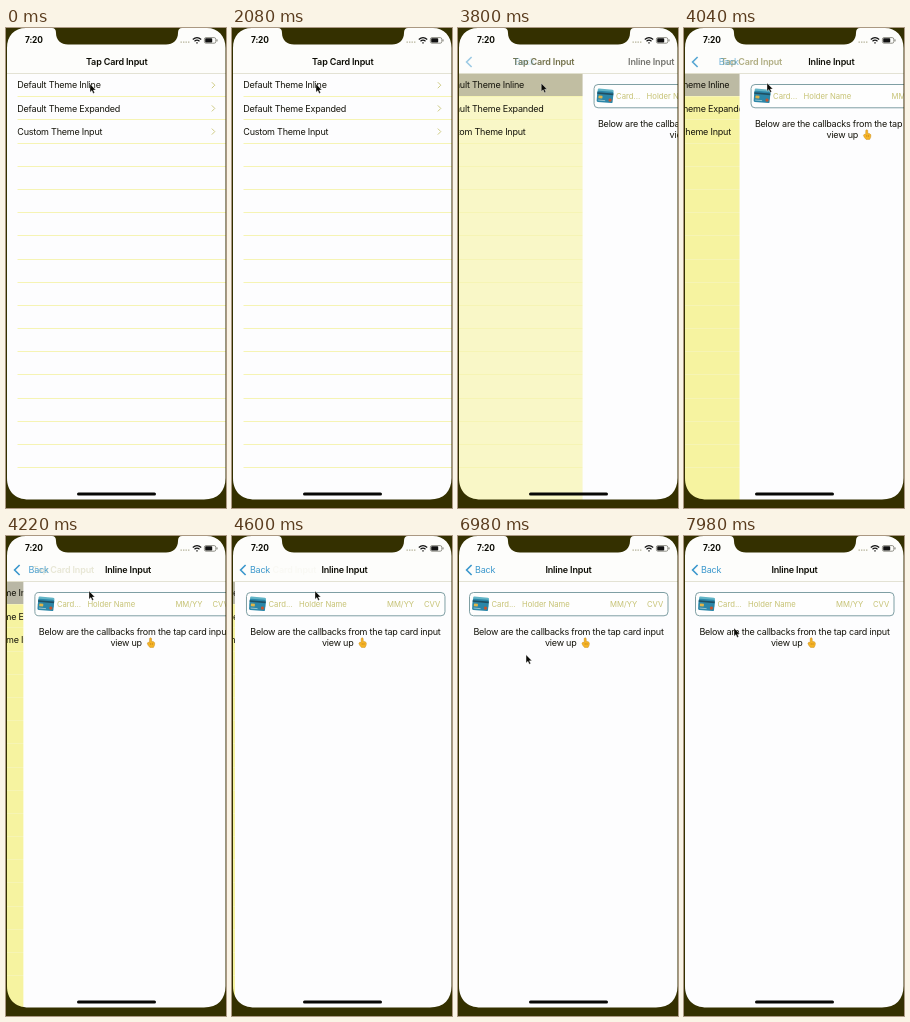
Recreate the animation shown at these times as an HTML page. Size 220x480 px, loop 8000 ms.

```html
<!DOCTYPE html>
<html lang="en">
<head>
<meta charset="utf-8">
<title>Card input demo</title>
<style>
  html, body { margin: 0; width: 100%; height: 100%; overflow: hidden; background: #343000; }
  svg { display: block; width: 100%; height: 100%; }
  text { font: 400 9px Inter, Roboto, sans-serif; letter-spacing: -.22px; fill: #14130a; white-space: pre; }
  .bold { font-weight: 600; letter-spacing: -.16px; fill: #0c0c04; }
  .mid { text-anchor: middle; }
  .hint { font-size: 7.7px; letter-spacing: 0; fill: #c6c274; }
  .blue { fill: #3a97cc; }
  .line { fill: none; stroke: #f6f4b4; stroke-width: 1; }
</style>
</head>
<body>
<svg viewBox="0 0 220 480" preserveAspectRatio="none">
  <rect width="220" height="480" fill="#fdfdfe"/>

  <g id="list">
    <rect id="tint" y="45" width="290" height="430" fill="#f6f3a0"/>
    <rect id="press" y="45.5" width="290" height="23.2"/>
    <g id="rows"></g>
  </g>

  <g id="detail">
    <rect y="45" width="220" height="430" fill="#fdfdfe"/>
    <rect x="11.5" y="56.5" width="198.5" height="23.3" rx="4" fill="#fefefe" stroke="#7f9fa4"/>
    <g transform="rotate(5 22 68)">
      <rect x="14.6" y="61" width="16" height="10" rx="1.3" fill="#62b4c6"/>
      <rect x="14.5" y="63.2" width="16" height="11.3" rx="1.3" fill="#2b86a8"/>
      <rect x="14.5" y="64.8" width="16" height="1.6" fill="#1f4f62"/>
      <rect x="16" y="68" width="4" height="2.8" rx=".5" fill="#e0b548"/>
      <path d="M16 72.6h7" stroke="#a9cfd6" stroke-width=".8"/>
      <circle cx="27.8" cy="71.6" r="1.6" fill="#c4552f"/>
    </g>
    <text class="hint" x="33.5" y="70.8">Card...</text>
    <text class="hint" x="64" y="70.8">Holder Name</text>
    <text class="hint" x="152" y="70.8">MM/YY</text>
    <text class="hint" x="189" y="70.8">CVV</text>
    <text class="mid" x="110.5" y="99.3">Below are the callbacks from the tap card input</text>
    <text x="87" y="109.6">view up</text>
    <path d="M126.3 102.2q1.1-.9 1.8.1l.2 3.3q2-.4 3 1.2q.3 2.6-1.2 4.6h-3.6q-2.2-2-2.6-4.2q.6-1.4 2.2-.6z" fill="#f6b526" stroke="#c98a1c" stroke-width=".5"/>
    <path d="M127.2 107.2v1.6M129 107.2v1.6" stroke="#b97518" stroke-width=".6"/>
  </g>

  <rect width="220" height="45.5" fill="#fdfdfb"/>
  <path d="M0 45.5H220" stroke="#dedccb" stroke-width=".8"/>
  <text id="oldTitle" class="bold" y="37.2" x="80">Tap Card Input</text>
  <text id="newTitle" class="bold mid" y="37.2" x="110.5">Inline Input</text>
  <path id="chevron" d="M13.6 29l-5 5 5 5" fill="none" stroke="#3a97cc" stroke-width="1.6"/>
  <text id="back" class="blue" y="37.2" x="17">Back</text>

  <text class="bold" x="19" y="15.4" style="font-size:8.4px;font-weight:700">7:20</text>
  <path d="M174.5 14.2h9" stroke="#b5b39a" stroke-width="1.3" stroke-dasharray="1.4 1.1"/>
  <g fill="none" stroke="#111" stroke-width="1.3">
    <path d="M186.8 11.4q4.2-3.4 8.4 0M188.5 13.2q2.5-2 5 0"/>
    <path d="M190.3 14.8h1.4"/>
  </g>
  <rect x="198.4" y="9.6" width="11.4" height="5.6" rx="1.6" fill="none" stroke="#77766c" stroke-width=".8"/>
  <rect x="199.2" y="10.3" width="7" height="4.2" rx=".8" fill="#111"/>
  <path d="M211 11.4v2" stroke="#77766c"/>

  <rect x="71" y="464.6" width="79" height="3" rx="1.5" fill="#080806"/>
  <path fill="#343000" fill-rule="evenodd" d="M0 0H220V480H0Z
    M1 20C1 8 8 0 20 0H46Q50 0 50 5C50 12 55 16.5 62 16.5H160C167 16.5 172 12 172 5Q172 0 176 0H201C212 0 219.5 8 219.5 20V450C219.5 463 212 471.5 198 471.5H23C9 471.5 1 463 1 450Z"/>
  <path id="cursor" d="M0 0V8.2L1.9 6.5 3.2 9.4 4.6 8.8 3.3 6H5.8Z" fill="#0a0a06" stroke="#fff" stroke-width=".35"/>
</svg>
<script>
const LOOP = 8000, STEP = 140 / 3;
const PRESS = 72, PUSH = 77.1, RATE = .301;
const path = [[0, 84, 56], [3500, 84, 56], [4000, 83, 55], [6250, 83, 55],
  [6980, 68, 119], [7520, 60, 148], [7980, 50, 92]];

const el = id => document.getElementById(id);
const move = (id, x, y = 0) => el(id).setAttribute('transform', `translate(${x} ${y})`);
const fade = (id, v) => el(id).setAttribute('opacity', Math.max(0, Math.min(1, v)));
const fill = (id, color) => el(id).style.fill = color;
const mix = (a, b, u) => `rgb(${a.map((v, i) => Math.round(v + (b[i] - v) * u))})`;

const labels = ['Default Theme Inline', 'Default Theme Expanded', 'Custom Theme Input'];
let rows = '';
for (let i = 0; i < 17; i++) {
  const y = 45.4 + 23.2 * i;
  rows += `<path class="line" d="M11.5 ${Math.floor(y + 23.2) + .5}H220"/>`;
  if (labels[i]) rows += `<text x="11.3" y="${y + 15}">${labels[i]}</text>
    <path d="M205.8 ${y + 8.8}l3 3-3 3" fill="none" stroke="#cfcb84"/>`;
}
el('rows').innerHTML = rows;

// Three pictures per 140 ms, shown at 0, 20 and 120 ms.
function tick(t) {
  const phase = t % 140;
  return Math.floor(t / 140) * 3 + (phase < 20 ? 0 : phase < 120 ? 1 : 2);
}

function pointer(t) {
  const i = path.findIndex(k => k[0] > t);
  if (i < 0) return path[path.length - 1].slice(1);
  const [a, ax, ay] = path[i - 1], [b, bx, by] = path[i];
  const u = (t - a) / (b - a), e = u * u * (3 - 2 * u);
  return [ax + (bx - ax) * e, ay + (by - ay) * e];
}

function render(t) {
  const n = tick(t);
  const s = Math.max(0, n - PUSH) * RATE;
  let rest = (1 + s) * Math.exp(-s);
  if (rest < .001) rest = 0;
  const done = 1 - rest;

  move('list', -66 * done);
  move('detail', 220 * rest);
  fade('tint', done * 1.33);
  fade('press', n >= PRESS ? 1 : 0);
  fill('press', mix([200, 197, 159], [184, 182, 165], done));

  move('oldTitle', -58 * done);
  fade('oldTitle', 1 - done * .7 - Math.max(0, done - .75) * 1.2);
  fill('oldTitle', mix([12, 12, 4], [120, 114, 0], done));
  move('newTitle', 146 * rest);
  fade('newTitle', done * 1.3);
  move('back', 70 * rest);
  fade('back', done * 1.2 - .2);
  fade('chevron', done * 1.15);

  move('cursor', ...pointer(n * STEP));
}

function loop(now) {
  render(now % LOOP);
  requestAnimationFrame(loop);
}
render(0);
requestAnimationFrame(loop);
</script>
</body>
</html>
```
